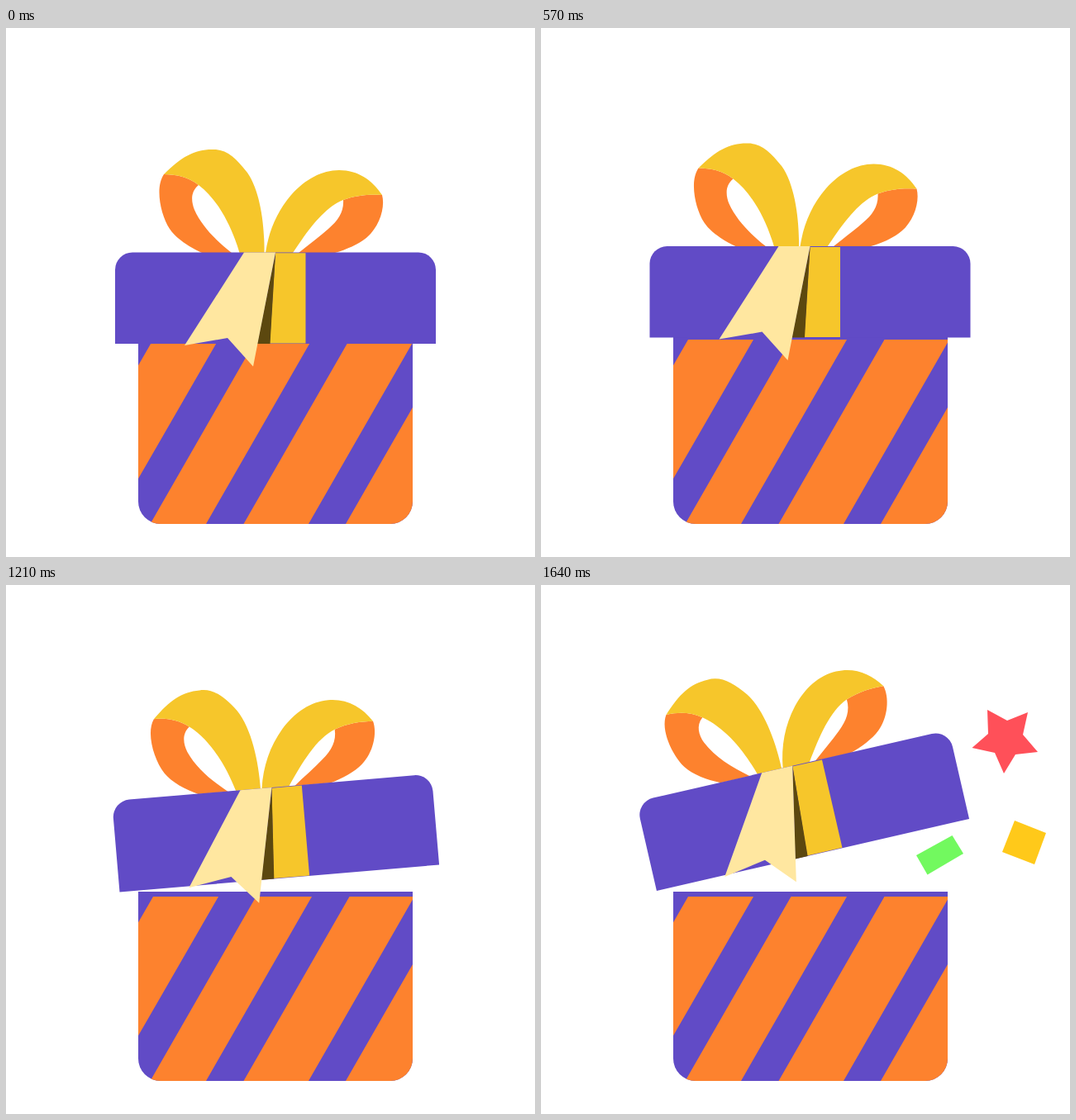
Write an HTML page that moves like this. It is 640 px wide and 640 px high and loops after 2 s.

```html
<!DOCTYPE html>
<html lang="en">
<head>
<meta charset="utf-8">
<title>Gift box</title>
<style>
  html, body { margin: 0; height: 100%; overflow: hidden; background: #fff; }
  svg { display: block; width: 100%; height: 100%; }
  .purple { fill: #614bc6; }
  .orange { fill: #fd822e; }
  .yellow { fill: #f6c62b; }
</style>
</head>
<body>
<svg viewBox="0 0 640 640">
  <clipPath id="boxShape"><path d="M160 371H492V573A27 27 0 0 1 465 600H187A27 27 0 0 1 160 573Z"/></clipPath>
  <g clip-path="url(#boxShape)">
    <path class="purple" d="M160 371H492V600H160Z"/>
    <path class="orange" d="M178 377h79l-128.5 223h-79zM302.500 377h67.500l-128 223h-67.500zM415.500 377h78.500l-128 223h-78.500zM539 377h79l-128 223h-79z"/>
  </g>

  <g id="confetti">
    <path fill="#ff5059" d="M540 151L564 164 589 154 583 181 601 202 574 205 560 228 549 203 521.500 197 541 180Z"/>
    <path fill="#ffc91a" d="M573 285L611 300 597 338 558 323Z"/>
    <path fill="#72f95f" d="M497.500 303L511 325 467.500 350.500 454 327Z"/>
  </g>

  <!-- lid and bow, origin at the middle of the lid's lower edge -->
  <g id="lid"><g transform="translate(-326 -382)">
    <path class="orange" d="M191 177C206 177 220 180 233 190C223 198 224 210 228 220C237 240 254 257 273 272H237C222 265 206 255 198 243C187 226 180 193 191 177Z"/>
    <path class="yellow" d="M191 177C212 156 228 147 249 147C266 146 278 157 292 175C308 198 313 240 312.500 272H282.500C274 243 258 209 233 190C220 180 206 177 191 177Z"/>
    <path class="orange" d="M455 202C440 201 424 202 408 208C409 222 402 233 390 243C379 253 366 262 354 272H398C412 268 428 261 437 253C452 240 459 217 455 202Z"/>
    <path class="yellow" d="M314 272C318 245 328 222 345 202C362 183 382 172 403 172C426 172 443 184 455 202C440 201 424 202 408 208C385 217 365 245 347 272Z"/>
    <path class="purple" d="M132 382V292.500A21 21 0 0 1 153 271.500H499A21 21 0 0 1 520 292.500V382Z"/>
    <path class="yellow" d="M326 272.300H362.500V381.500H319Z"/>
    <path fill="#5c480f" d="M326 272L319.500 382H304Z"/>
    <path fill="#ffe7a0" d="M288 271.500H326L299 409.500 268 375 216 384Z"/>
  </g></g>
</svg>
<script>
const LOOP = 2000, FPS = 14, LAST_STEP = 23, BURST_STEP = 17;

// step, x, y, angle
const lidKeys = [
  [0, 326, 382, 0],
  [4, 325.6, 354, 0],
  [8, 325.5, 374.6, 0],
  [10.5, 325.6, 386, 0],
  [14, 326, 382, 0],
  [17, 330.8, 355, -4.88],
  [19, 330.5, 341.8, -7.33],
  [23, 329, 326.5, -12.96]
];

// end centre, travel per step, scale change per step
const bursts = [
  { x: 562, y: 186.5, dx: 12.8, dy: -11.6, ds: 0.077 },
  { x: 584.8, y: 311.5, dx: 14.5, dy: -1.75, ds: 0.067 },
  { x: 482.5, y: 326.5, dx: 6.4, dy: -0.9, ds: 0.077 }
];

const lid = document.getElementById('lid');
const confetti = document.getElementById('confetti');

function lidPose(step) {
  const i = Math.max(1, lidKeys.findIndex(key => key[0] >= step));
  const a = lidKeys[i - 1], b = lidKeys[i];
  const u = (step - a[0]) / (b[0] - a[0]);
  return a.map((v, n) => v + (b[n] - v) * u);
}

function draw(time) {
  const step = Math.min(LAST_STEP, Math.floor((time % LOOP + 5) * FPS / 1000));
  const [, x, y, angle] = lidPose(step);
  lid.setAttribute('transform', `translate(${x} ${y}) rotate(${angle})`);

  confetti.setAttribute('visibility', step < BURST_STEP ? 'hidden' : 'visible');
  const left = LAST_STEP - step;
  bursts.forEach(({ x, y, dx, dy, ds }, i) => {
    confetti.children[i].setAttribute('transform',
      `translate(${x - dx * left} ${y - dy * left}) scale(${1 - ds * left}) translate(${-x} ${-y})`);
  });
}

const start = performance.now();
function tick() {
  draw(performance.now() - start);
  requestAnimationFrame(tick);
}
tick();
</script>
</body>
</html>
```
